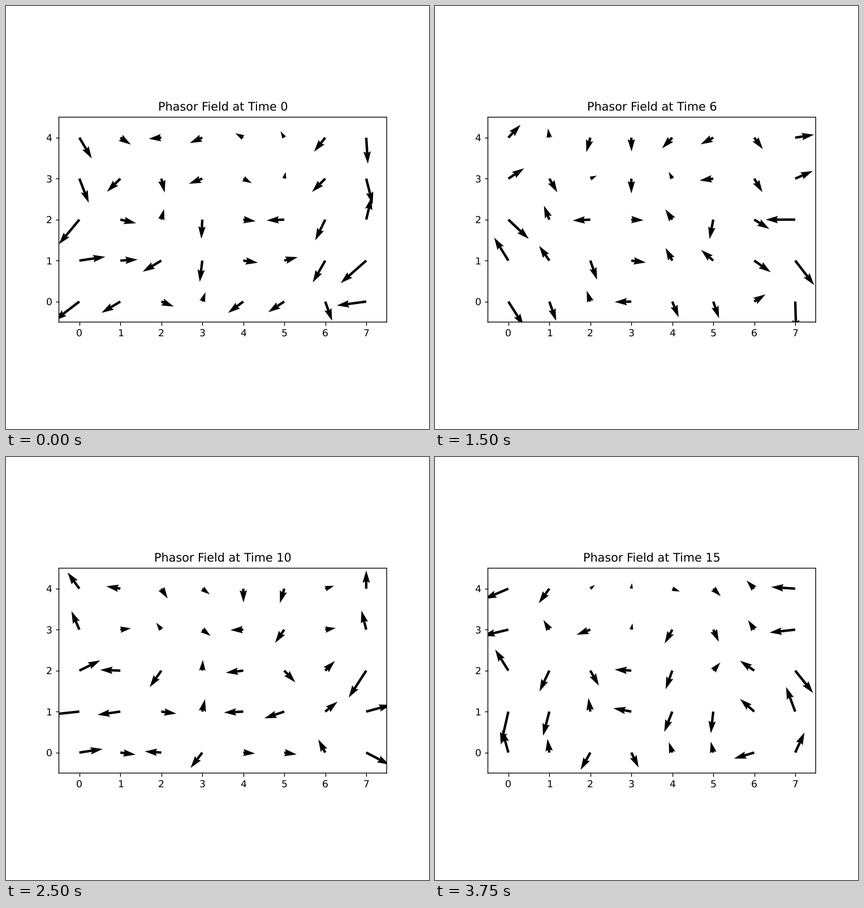
Recreate the animation shown at these times as a matplotlib script. Size 748x748 px, loop 4 s.

```python
import numpy as np
import matplotlib.pyplot as plt
from matplotlib.animation import FuncAnimation

SIZE, INCHES = 748, 6
FRAMES, INTERVAL = 16, 250
COLS, ROWS = 8, 5
RATE = 16.3             # degrees per step, shared by all phasors
MID = 8                 # step at which the headings hold
BIAS = -0.06 - 0.10j    # constant part of the field

# Headings in degrees, bottom row first
HEADINGS = np.array([
    [-16, -26, 127, 198, 340, 336, 72, 310],
    [146, 145, 334, 40, 137, 156, 11, 349],
    [-1, 132, 201, 46, 140, 298, 16, 204],
    [71, 350, 71, 316, 128, 201, 351, 63],
    [82, 118, 294, 318, 253, 227, 359, 51],
])

plt.rcParams["path.snap"] = False
plt.rcParams["text.hinting"] = "none"

x, y = np.meshgrid(np.arange(COLS), np.arange(ROWS))

# Long phasors at the left and right edges, a soft swell from row to row
center = (COLS - 1) / 2
lengths = 0.33 + 0.3 * ((x - center) / center) ** 4 + 0.09 * np.sin(1.2 * y + 0.3)


def field(t):
    turn = np.radians(HEADINGS + RATE * (t - MID))
    return BIAS + lengths * np.exp(1j * turn)


fig, ax = plt.subplots(figsize=(INCHES, INCHES), dpi=SIZE / INCHES)
ax.set_aspect("equal")
ax.set_xlim(-0.5, COLS - 0.5)
ax.set_ylim(-0.5, ROWS - 0.5)
ax.set_xticks(range(COLS))
ax.set_yticks(range(ROWS))

start = field(0)
arrows = ax.quiver(x, y, start.real, start.imag, scale_units="xy", scale=1)
title = ax.set_title("Phasor Field at Time 0")


def update(t):
    z = field(t)
    arrows.set_UVC(z.real, z.imag)
    title.set_text(f"Phasor Field at Time {t}")
    return arrows, title


anim = FuncAnimation(fig, update, frames=FRAMES, interval=INTERVAL,
                     repeat=True, repeat_delay=0)
plt.show()
```
